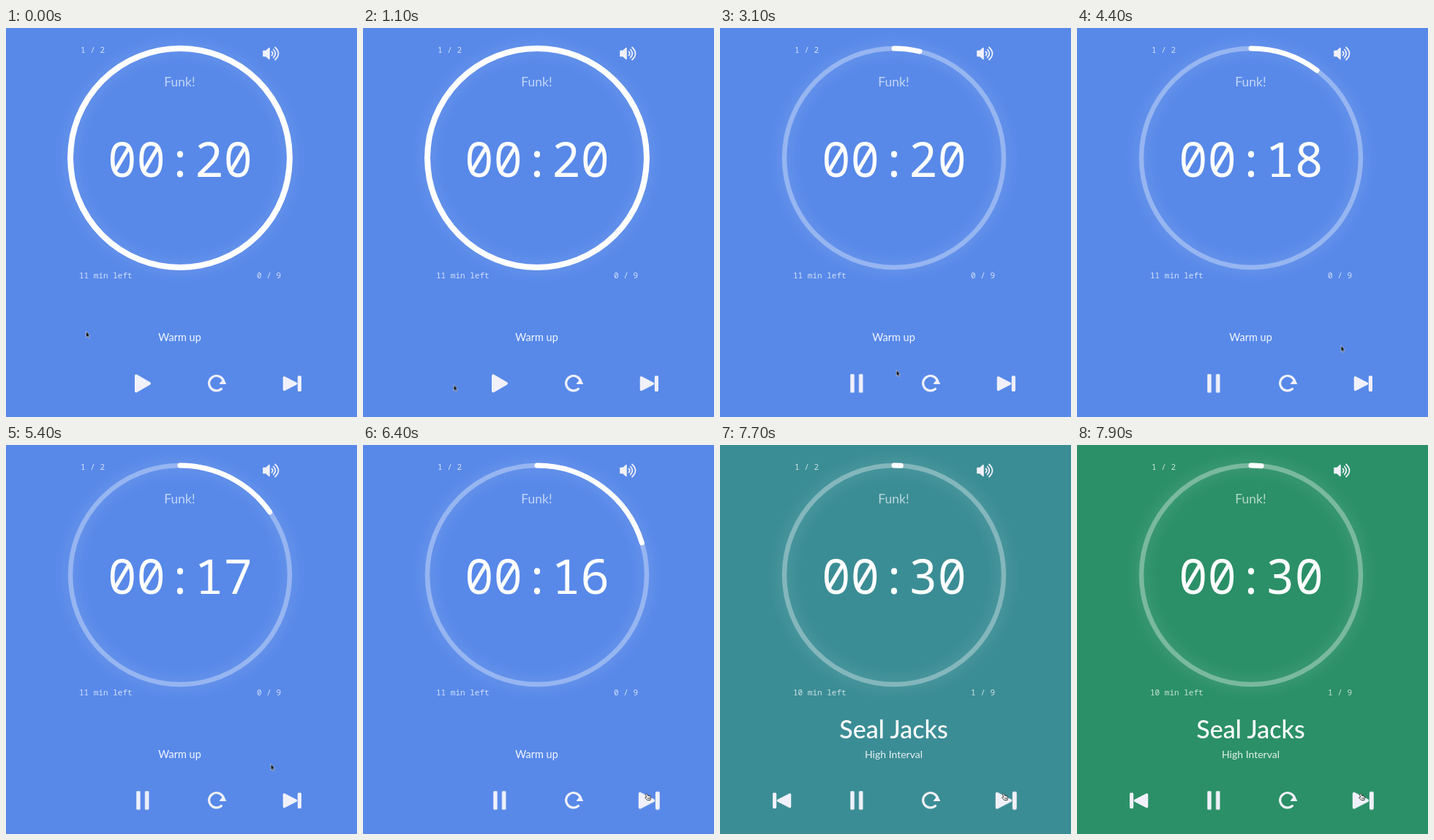
Recreate the animation shown at these times as an HTML page. Size 480x533 px, loop 8000 ms.

```html
<!DOCTYPE html>
<html lang="en">
<head>
<meta charset="utf-8">
<title>Interval timer</title>
<style>
  html, body { margin: 0; width: 100%; height: 100%; overflow: hidden; background: #5889e9; }
  svg { display: block; width: 100vw; height: 100vh; }
  svg * { animation: 8s linear infinite; }
  text { fill: #fff; font-family: Lato, "Open Sans", sans-serif; }
  .mono { font-family: "Noto Sans Mono", "DejaVu Sans Mono", monospace; font-weight: 300; }
  .small { font-size: 11px; opacity: .75; }
  .digits { font-size: 66px; }
  .mid { text-anchor: middle; }
  .icon { fill: #f0f1fa; stroke: #f0f1fa; stroke-linejoin: round; stroke-linecap: round; }
  .line { fill: none; }
  .hover { transform-box: fill-box; transform-origin: center; }

  .bg { fill: #5889e9; animation-name: bg; }
  @keyframes bg {
    0%, 91.25% { fill: #5889e9; animation-timing-function: ease-in-out; }
    100% { fill: #299062; }
  }

  .ring { fill: none; stroke: #fff; }
  .glow { stroke-width: 14; opacity: .1; filter: blur(9px); }
  .track { stroke-width: 6.5; opacity: .33; }
  .full { stroke-width: 8; animation-name: full; }
  @keyframes full {
    0%, 29.3% { opacity: 1; }
    32%, 91.24% { opacity: 0; }
    91.25% { opacity: 1; }
    94%, 100% { opacity: 0; }
  }
  .arc { stroke-width: 7; stroke-linecap: round; animation-name: arc; }
  @keyframes arc {
    0%, 29.375% { stroke-dasharray: 0 400; }
    91.24% { stroke-dasharray: 89.1 400; }
    91.25% { stroke-dasharray: 0 400; }
    100% { stroke-dasharray: 6.3 400; }
  }

  .strip { animation-name: count; animation-timing-function: step-end; }
  @keyframes count {
    0% { transform: none; }
    29.375% { transform: none; }
    41.875% { transform: translateY(-100px); }
    54.375% { transform: translateY(-200px); }
    66.875% { transform: translateY(-300px); }
    79.375% { transform: translateY(-400px); }
    91.25%, 100% { transform: translateY(-500px); }
  }

  .before, .after, .play, .pause, .arrow, .hand { animation-timing-function: step-end; }
  .before { animation-name: before; }
  .after { animation-name: after; }
  .play { animation-name: play; }
  .pause { animation-name: pause; }
  .arrow { animation-name: arrow; }
  .hand { animation-name: hand; }
  @keyframes before { 0% { opacity: 1; } 91.25%, 100% { opacity: 0; } }
  @keyframes after { 0% { opacity: 0; } 91.25%, 100% { opacity: 1; } }
  @keyframes play { 0% { opacity: 1; } 27.5%, 100% { opacity: 0; } }
  @keyframes pause { 0% { opacity: 0; } 27.5%, 100% { opacity: 1; } }
  @keyframes arrow { 0%, 34.5% { opacity: 1; } 25%, 74% { opacity: 0; } 100% { opacity: 0; } }
  @keyframes hand { 0%, 34.5% { opacity: 0; } 25%, 74% { opacity: 1; } 100% { opacity: 1; } }

  .toggle { animation-name: toggle; }
  @keyframes toggle {
    0%, 24.5% { transform: none; }
    26%, 34% { transform: scale(1.14); }
    36%, 100% { transform: none; }
  }
  .skip { animation-name: skip; }
  @keyframes skip {
    0%, 73.5% { transform: none; }
    75.5%, 100% { transform: scale(1.15); }
  }
  .prev { animation-name: prev; }
  @keyframes prev {
    0%, 91.25% { opacity: 0; }
    95.5%, 100% { opacity: 1; }
  }

  .cursor { animation-name: cursor; animation-timing-function: ease-in-out; }
  @keyframes cursor {
    0%, 7% { transform: translate(109px, 415px); }
    18% { transform: translate(130px, 521px); }
    22% { transform: translate(172px, 517px); }
    26%, 33% { transform: translate(189px, 487px); }
    45% { transform: translate(300px, 446px); }
    52%, 66% { transform: translate(360.5px, 434.5px); }
    76%, 100% { transform: translate(385px, 477px); }
  }
</style>
</head>
<body>
<svg viewBox="0 0 480 533">
  <defs>
    <clipPath id="row"><rect x="120" y="140" width="236" height="80"/></clipPath>
    <g id="next">
      <path d="M380.5 479V495.5L396.5 487.2Z" stroke-width="3.5"/>
      <path class="line" d="M401.3 478V496" stroke-width="5" stroke-linecap="butt"/>
      <rect x="399" y="476.5" width="4.8" height="21.5" rx="1" stroke="none"/>
    </g>
  </defs>
  <rect class="bg" width="480" height="533"/>

  <g transform="rotate(-90 238 178)">
    <circle class="ring glow" cx="238" cy="178" r="150"/>
    <circle class="ring track" cx="238" cy="178" r="150"/>
    <circle class="ring full" cx="238" cy="178" r="150"/>
    <circle class="ring arc" cx="238" cy="178" r="150" pathLength="360"/>
  </g>

  <text class="mono small" x="102" y="34">1 / 2</text>
  <text class="mid" x="237.5" y="80" font-size="17.5" opacity=".65">Funk!</text>
  <g clip-path="url(#row)">
    <g class="strip mono digits mid">
      <text class="mono" x="238" y="204">00:20</text>
      <text class="mono" x="238" y="304">00:19</text>
      <text class="mono" x="238" y="404">00:18</text>
      <text class="mono" x="238" y="504">00:17</text>
      <text class="mono" x="238" y="604">00:16</text>
      <text class="mono" x="238" y="704">00:30</text>
    </g>
  </g>

  <g class="before">
    <text class="mono small" x="100" y="343">11 min left</text>
    <text class="mono small" x="343" y="343">0 / 9</text>
    <text class="mid" x="237.5" y="429" font-size="14.5" opacity=".92">Warm up</text>
  </g>
  <g class="after">
    <text class="mono small" x="100" y="343">10 min left</text>
    <text class="mono small" x="343" y="343">1 / 9</text>
    <text class="mid" x="237.5" y="402" font-size="34" font-weight="500">Seal Jacks</text>
    <text class="mid" x="237.5" y="429" font-size="14" opacity=".88">High Interval</text>
  </g>

  <g class="icon">
    <path d="M352 31.5H355.5L360 27.5V42.5L355.5 38.5H352Z" stroke-width="1.6"/>
    <path class="line" d="M363.5 32.5Q366 35 363.5 37.5M365.8 29.5Q371 35 365.8 40.5M368 26.5Q377 35 368 43.5" stroke-width="1.8"/>
  </g>

  <g class="prev"><use class="icon" href="#next" transform="translate(476 0) scale(-1 1)"/></g>
  <g class="icon hover toggle">
    <path class="play" d="M178 476.5V497.5L196 487Z" stroke-width="4"/>
    <path class="pause" d="M179.5 475.5V498.5H182.5V475.5ZM191.2 475.5V498.5H194.2V475.5Z" stroke-width="2.5"/>
  </g>
  <g class="icon">
    <path class="line" d="M294.5 494.5A10.2 10.2 0 1 1 297 482.2" stroke-width="3.2"/>
    <path d="M292.5 487.5H300.5L297.5 481.5Z" stroke-width="1.2"/>
  </g>
  <g class="hover skip"><use class="icon" href="#next"/></g>

  <g class="cursor">
    <path class="arrow" d="M.5 .5V9L2.4 7.3L3.8 10.2L5 9.6L3.7 6.8H6Z" fill="#111" stroke="#dfe5f5" stroke-width=".6"/>
    <path class="hand" d="M2.2 .8Q3.2 .2 3.7 1.3L4.4 3.4L7.2 4Q8.5 4.4 8.5 6L8 9.6H3.7L.7 6.2Q.9 5 2.7 5.8L1.7 2Q1.6 1.1 2.2 .8ZM4.8 6V8M6.5 6V8" fill="#fff" stroke="#222" stroke-width=".9"/>
  </g>
</svg>
</body>
</html>
```
